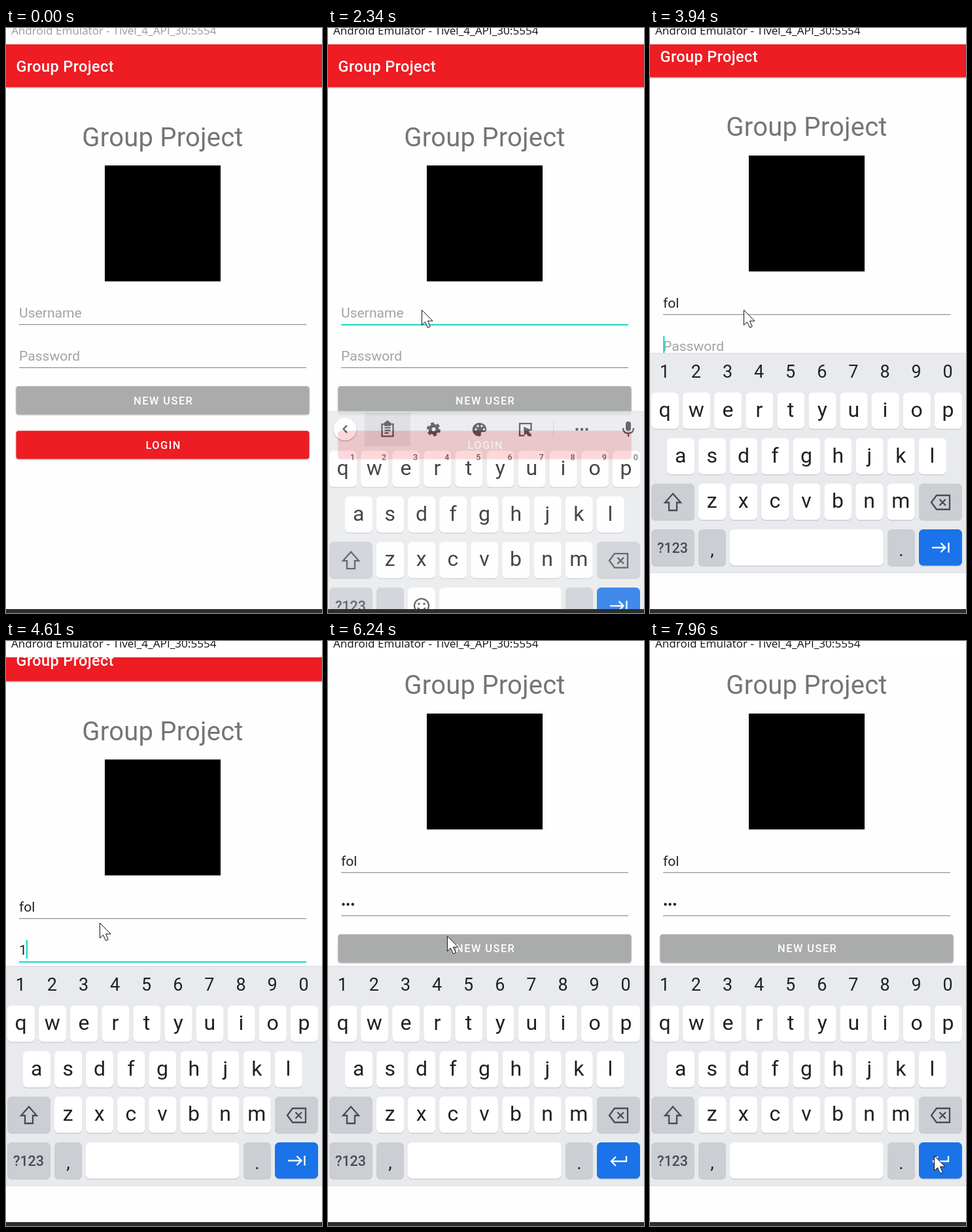
Animation, 483 px wide and 895 px high, one loop 8 s. Source, as an HTML page:

```html
<!DOCTYPE html>
<html lang="en">
<head>
<meta charset="utf-8">
<title>Login screen</title>
<style>
html, body { margin: 0; width: 100%; height: 100%; overflow: hidden; background: #fff; }
svg { display: block; }
text { font-family: Roboto, sans-serif; fill: #202124; }
.mid { text-anchor: middle; }
.medium { font-weight: 500; }
.soft { fill: #5f6368; }
.field { font-size: 21.1px; }
.hint { fill: #a3a3a3; }
.button { font-size: 16.4px; font-weight: 500; letter-spacing: 1.47px; fill: #fff; }
.raised { filter: drop-shadow(0 1.2px 1px #0005); }
.line { fill: none; stroke: #494b4f; stroke-width: 2.3; }
.solid { fill: #494b4f; }
.white { stroke: #fff; }
</style>
</head>
<body>
<svg width="483" height="895" viewBox="0 0 483 895">
  <rect width="483" height="895" fill="#fefefe"/>
  <g id="page">
    <rect class="raised" y="25" width="483" height="65.5" fill="#ee1c23"/>
    <text class="medium" x="15.5" y="67" font-size="23.5" letter-spacing=".4" style="fill:#fff">Group Project</text>
    <text class="mid" x="239.5" y="180.5" font-size="40" letter-spacing=".2" style="fill:#757575">Group Project</text>
    <rect x="151" y="210.3" width="177" height="177.3"/>
    <text class="field hint" id="userHint" x="20" y="443">Username</text>
    <text class="field" id="user" x="20" y="443"></text>
    <rect id="userLine" x="20" width="439"/>
    <text class="field hint" id="passHint" x="20" y="509">Password</text>
    <text class="field" id="pass" x="20" y="509"></text>
    <rect id="passLine" x="20" width="439"/>
    <rect id="caret" width="2.4" height="28.5" fill="#26d9ca"/>
    <rect class="raised" x="15.5" y="548" width="448" height="43" rx="4" fill="#aaabab"/>
    <text class="button mid" x="240.7" y="575.7">NEW USER</text>
    <rect class="raised" x="15.5" y="616.3" width="448" height="43" rx="4" fill="#ee1c23"/>
    <text class="button mid" x="240.7" y="644">LOGIN</text>
  </g>

  <g id="keyboard">
    <rect y="497" width="483" height="337" fill="#dfe1e4"/>
    <rect y="498.5" width="483" height="334" fill="#e8eaed"/>
    <rect y="834" width="483" height="56" fill="#fefefe"/>
    <g id="keys"></g>
    <g id="hints"></g>
    <g id="digits"></g>
    <g id="emoji" class="line">
      <circle cx="143" cy="795" r="11"/>
      <path d="M137 798q6 7 12 0"/>
      <path d="M139 790.5v3M147 790.5v3" stroke-width="3"/>
    </g>
    <path class="line" d="M35 712.5L23 726H29V738H41V726H47Z"/>
    <path class="line" d="M438 715H458V736.5H438L430 725.7ZM442.5 721l9.5 9.5m0-9.5l-9.5 9.5"/>
    <path class="line white" id="tabIcon" d="M431 795H451M444.5 788l7 7-7 7M456.5 787.5V802.5"/>
    <path class="line white" id="enterIcon" d="M456 788V796H433M440 789l-7 7 7 7"/>
    <g id="strip">
      <circle class="raised" cx="26" cy="524.5" r="17.5" fill="#fff"/>
      <path class="line" id="chevron"/>
      <rect class="solid" x="455" y="513" width="8" height="14.5" rx="4"/>
      <path class="line" d="M451 523q0 8 8 8t8-8M459 531v5" stroke-width="2"/>
    </g>
    <g id="tools">
      <rect id="pressed" x="56" y="499" width="70" height="52" fill="#d9dbde"/>
      <path class="line" d="M82.5 517H99.5V535.5H82.5ZM86.5 522.5h9m-9 4h9m-9 4h6"/>
      <path class="solid" d="M86 514h2.5a2.500 2.5 0 0 1 5 0H96V520H86Z"/>
      <circle class="line" cx="161.5" cy="525" r="5.5" style="stroke-width:5"/>
      <circle class="line" cx="161.5" cy="525" r="8.8" style="stroke-width:3.6" stroke-dasharray="5 4.215"/>
      <path class="solid" d="M232 515a10.3 10.3 0 1 0 0 20.5q2.5-.5 1.7-3.5-.5-3 2.3-3h3q3.5-.5 3.3-5-1.3-8-10.3-9z"/>
      <g fill="#e8eaed"><circle cx="226" cy="525" r="1.7"/><circle cx="229" cy="520" r="1.7"/><circle cx="235" cy="520" r="1.7"/><circle cx="238.5" cy="525" r="1.7"/></g>
      <path class="line" d="M300 534.5H293V516H310.5V527"/>
      <path class="solid" d="M299 521l12 5-4.5 2.500 4.500 4.500v2.500h-5l-3-4-3 3z"/>
      <path d="M344.5 512V538" stroke="#d0d2d6"/>
      <g class="solid"><circle cx="380.5" cy="525" r="2.3"/><circle cx="388" cy="525" r="2.3"/><circle cx="395.5" cy="525" r="2.3"/></g>
    </g>
    <g id="words" font-size="21.1">
      <text class="mid soft" x="103.5" y="532">fol</text>
      <text class="mid soft" x="238" y="532">found</text>
      <text class="mid soft" x="372" y="532">four</text>
      <path d="M167.5 510V538M309.5 510V538" stroke="#c6c8cc"/>
    </g>
  </g>

  <rect width="483" height="25" fill="#fff"/>
  <text id="caption" x="8" y="10" font-size="17.1" style="font-family:'Open Sans','Noto Sans',sans-serif">Android Emulator - Tivel_4_API_30:5554</text>
  <rect y="889" width="483" height="6" fill="#2b2d2f"/>
  <path id="cursor" d="M.5.5V23.5L5.5 18.7 9.5 27.5 13.3 25.7 9.5 17.2H17Z" fill="#fff" stroke="#111"/>
</svg>

<script>
const $ = id => document.getElementById(id);
const PITCH = 48.1;

function label(x, y, size, s, cls = '') {
  return `<text class="mid ${cls}" x="${x}" y="${y}" font-size="${size}">${s}</text>`;
}
function key(x, y, w, fill = '#fff', id = '') {
  const box = `x="${x}" width="${w}" height="55.5" rx="6.5"`;
  return `<g id="${id}"><rect ${box} y="${y + 1.3}" fill="#c6c9ce"/><rect ${box} y="${y}" fill="${fill}"/></g>`;
}

function buildKeys() {
  const grey = '#cbced3';
  let keys = '', hints = '', digits = '';
  [['qwertyuiop', 2], ['asdfghjkl', 26], ['zxcvbnm', 74]].forEach(([row, x0], r) => {
    [...row].forEach((c, i) => {
      const x = x0 + PITCH * i, y = 557.7 + 69.7 * r;
      keys += key(x, y, 42) + label(x + 20.7, y + 37.3, 32, c);
    });
  });
  [...'1234567890'].forEach((d, i) => {
    hints += label(37.5 + PITCH * i, 572, 12.7, d, 'medium soft');
    digits += label(22.3 + PITCH * i, 535, 27, d);
  });
  keys += key(2, 697, 66, grey) + key(411, 697, 66, grey)
    + key(2, 767, 66, grey) + label(34.5, 802.5, 21.5, '?123', 'medium solid')
    + key(74, 767, 42, grey) + label(95, 807, 28, ',')
    + key(122, 767, 234.5, '#fff', 'wideSpace')
    + `<g id="shortSpace">${key(122, 767, 42)}${key(170, 767, 186.5)}</g>`
    + key(363, 767, 42, grey) + label(384, 808, 28, '.')
    + key(411, 767, 66, '#1a73e8');
  $('keys').innerHTML = keys;
  $('hints').innerHTML = hints;
  $('digits').innerHTML = digits;
}

// Linear interpolation through [time, ...values] points
function track(points, t) {
  const n = points.findIndex(p => p[0] > t);
  if (n === 0) return points[0].slice(1);
  if (n < 0) return points[points.length - 1].slice(1);
  const a = points[n - 1], b = points[n], k = (t - a[0]) / (b[0] - a[0]);
  return a.slice(1).map((v, i) => v + (b[i + 1] - v) * k);
}
// Latest value of [time, value] steps
const step = (steps, t) => steps.reduce((v, s) => t >= s[0] ? s[1] : v, '');

const POINTER = [
  [240, 474, 782], [450, 380, 690], [730, 200, 520], [1010, 138, 444],
  [1210, 138, 444], [1530, 138, 436], [1780, 138, 436], [1790, 143, 431],
  [5890, 143, 431], [5960, 156, 446], [6730, 227, 460], [6870, 280, 447],
  [7210, 304, 439], [7540, 304, 439], [7680, 340, 530], [7820, 405, 715], [7960, 434, 787]
];
const SCROLL = [[3800, 0], [4070, 29], [5890, 29], [5960, 57.5], [6030, 80], [6170, 99.3]];
const SLIDE = [[2270, 220, .45], [2340, 90, .83], [2410, 25, 1], [2480, 0, 1]];
const USER = [[2940, 'f'], [3070, 'fo'], [3210, 'fol']];
const PASS = [[4610, '1'], [4940, '•2'], [5210, '••3'], [5960, '•••']];
const FOCUS = [[1340, 'user'], [3870, 'pass'], [5960, '']];
const CARET = [[1340, 1], [1990, 0], [2500, 1], [3670, 0], [3870, 1], [4340, 0], [4610, 1], [5690, 0]];

const show = (id, on) => $(id).style.display = on ? '' : 'none';

function field(id, value, y, focused) {
  $(id).textContent = value;
  show(id + 'Hint', !value);
  const line = $(id + 'Line');
  line.setAttribute('y', y);
  line.setAttribute('height', focused ? 2.2 : 1.2);
  line.setAttribute('fill', focused ? '#26d9ca' : '#8e8e8e');
}

function draw(t) {
  const focus = step(FOCUS, t);
  $('page').setAttribute('transform', `translate(0 ${-track(SCROLL, t)[0]})`);
  field('user', step(USER, t), 453, focus === 'user');
  field('pass', step(PASS, t), 519, focus === 'pass');
  $('user').style.textDecoration = t < 3870 ? 'underline 1px' : '';

  show('caret', focus && step(CARET, t));
  if (focus) {
    const width = $(focus).textContent ? $(focus).getComputedTextLength() : 0;
    $('caret').setAttribute('x', 20 + Math.max(0, width - 1.2));
    $('caret').setAttribute('y', focus === 'user' ? 420.3 : 486.3);
  }

  const [drop, alpha] = track(SLIDE, t);
  const numbers = t >= 3940, typed = t >= 3140, enter = t >= 6100;
  show('keyboard', t >= 2270);
  $('keyboard').setAttribute('transform', `translate(0 ${drop})`);
  $('keyboard').setAttribute('opacity', alpha);
  show('digits', numbers);
  show('wideSpace', numbers);
  for (const id of ['hints', 'emoji', 'shortSpace', 'strip']) show(id, !numbers);
  show('tools', !typed);
  show('pressed', t < 2740);
  show('words', typed && !numbers);
  $('chevron').setAttribute('d', typed ? 'M23 519l5.5 5.5-5.5 5.5' : 'M29 519l-5.5 5.5 5.5 5.5');
  show('tabIcon', !enter);
  show('enterIcon', enter);

  $('caption').style.fill = t < 1210 ? '#999' : '#111';
  show('cursor', t >= 240);
  $('cursor').setAttribute('transform', `translate(${track(POINTER, t)})`);
}

buildKeys();
const start = performance.now();
function frame() {
  draw((performance.now() - start) % 8000);
  requestAnimationFrame(frame);
}
frame();
</script>
</body>
</html>
```
